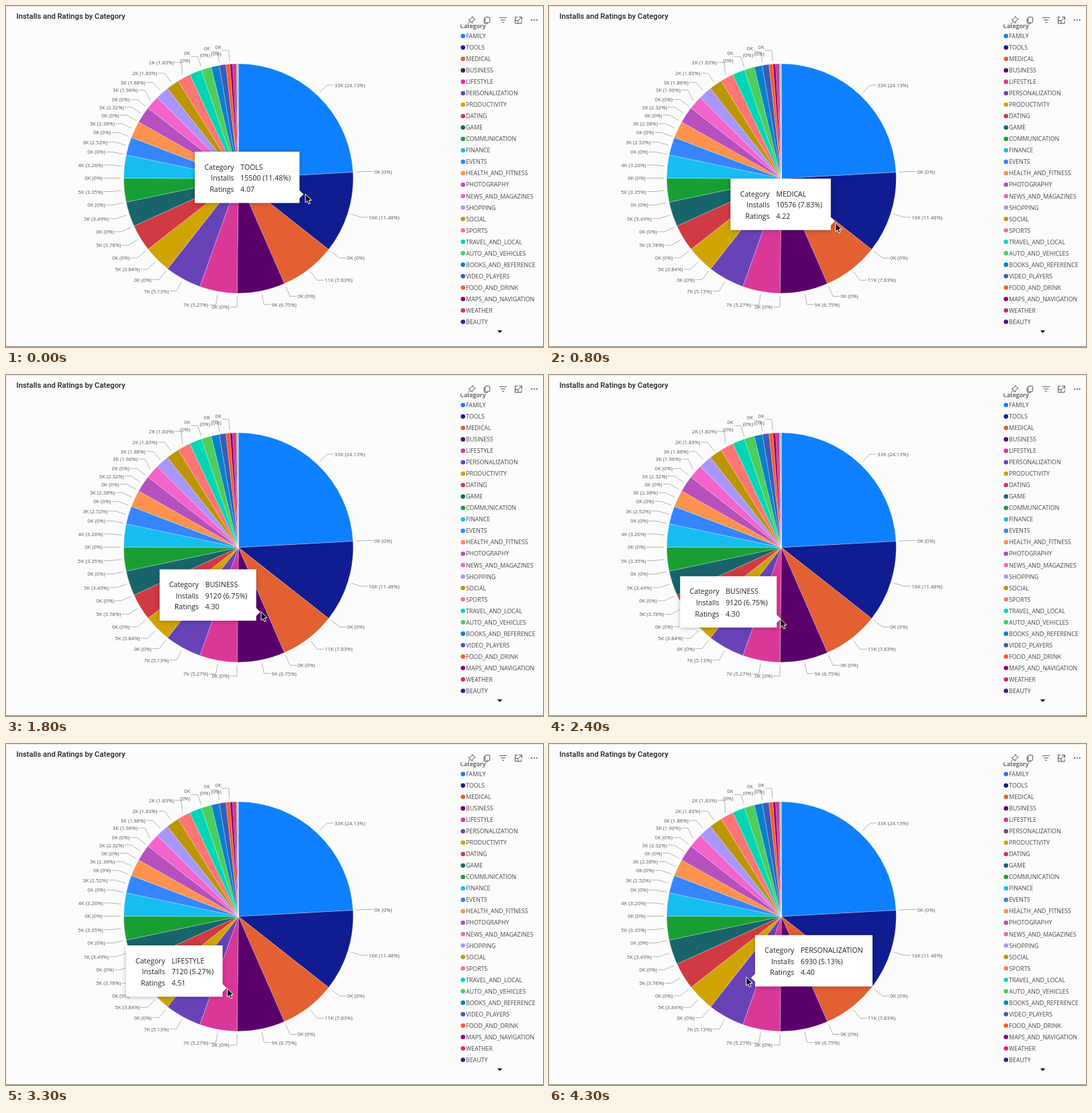
These frames come from a looping animation (800x508 px, 4.4 s). An HTML page:

```html
<!DOCTYPE html>
<html lang="en">
<head>
<meta charset="utf-8">
<title>Installs and Ratings by Category</title>
<style>
  html, body { margin: 0; width: 100%; height: 100%; overflow: hidden; background: #fcfcfc; }
  svg { display: block; width: 800px; height: 508px; font-family: "Open Sans", "Noto Sans", sans-serif; }
  .title { font: 500 11.25px Roboto, sans-serif; fill: #1f1e1d; }
  .legend { font-size: 8.82px; fill: #4a4846; }
  .label { font-size: 7.7px; fill: #5c5a58; }
  .leader { fill: none; stroke: #a3a19f; stroke-width: 0.8; }
  .slice { stroke: #fff; stroke-width: 0.5; stroke-opacity: 0.55; stroke-linejoin: round; }
  .icon { fill: none; stroke: #55534f; stroke-width: 1; }
  #tip { filter: drop-shadow(0 1px 3px rgba(0, 0, 0, 0.28)); }
  #tip path { fill: #fff; }
  #tip text { font-size: 10.55px; fill: #252423; }
</style>
</head>
<body>
<svg id="stage" viewBox="0 0 800 508">
  <defs><clipPath id="legendClip"><rect x="670" y="27.6" width="130" height="470"/></clipPath></defs>
  <rect width="800" height="508" fill="#fcfcfc"/>
  <rect width="800" height="1" fill="#e4e4e4"/>
  <rect width="1" height="508" fill="#ececec"/>
  <rect y="507" width="800" height="1" fill="#808080"/>
  <text class="title" x="15.6" y="19.4">Installs and Ratings by Category</text>
  <g class="icon">
    <path d="M694.5 15.5l4.6 4.6-1.6.5-2.6 2.6-.3 2.4-5.4-5.4 2.4-.3 2.6-2.6zM691.8 22.8l-3.6 3.6"/>
    <path d="M714.8 16.5h4.4a1.5 1.5 0 0 1 1.5 1.5v5.3a1.5 1.5 0 0 1-1.5 1.5h-4a1.5 1.5 0 0 1-1.5-1.5v-5.3a1.5 1.5 0 0 1 1.1-1.5zM713.2 18.3q-1 .4-1 1.5v4.5q0 2 2 2h3.8"/>
    <path d="M735 17.3h11M737 20.8h7M739 24.3h3"/>
    <path d="M762 16.5h-3.5v9.5h9.5v-3.5M764 16.5h4.5v4.5M768.3 16.7l-4.8 4.8M758.5 21.5h4.5v4.5"/>
  </g>
  <g fill="#44423f"><circle cx="783" cy="20.8" r="1"/><circle cx="786.8" cy="20.8" r="1"/><circle cx="790.6" cy="20.8" r="1"/></g>
  <g id="legend" class="legend" clip-path="url(#legendClip)">
    <text x="676.6" y="33.2" font-weight="600">Category</text>
    <path d="M731.8 483.3h7.6l-3.8 4z" fill="#111"/>
  </g>
  <g id="pie"></g>
  <g id="labels"></g>
  <g id="tip">
    <path id="box"/>
    <g id="tipText"></g>
  </g>
  <path id="cursor" d="M0 0V13L2.9 10.3 4.9 15 7.2 14 5.2 9.4H9.2Z" fill="#0a0a0a" stroke="#fff" stroke-width="1" stroke-linejoin="round"/>
</svg>
<script>
const $ = id => document.getElementById(id);
const CX = 346.3, CY = 257, R = 170.9;

// name, colour, share of the whole in percent
const slices = `FAMILY 0f80ff 24.13
TOOLS 111c90 11.48
MEDICAL e26032 7.83
BUSINESS 5b006b 6.75
LIFESTYLE da3899 5.27
PERSONALIZATION 6843b8 5.13
PRODUCTIVITY d0a400 3.84
DATING d13a43 3.78
GAME 17646a 3.49
COMMUNICATION 189f33 3.35
FINANCE 16bdf2 3.26
EVENTS 3585ff 2.52
HEALTH_AND_FITNESS ff924e 2.38
PHOTOGRAPHY b550be 2.32
NEWS_AND_MAGAZINES f264cb 1.96
SHOPPING aa95ff 1.88
SOCIAL bb9500 1.83
SPORTS ff7474 1.83
TRAVEL_AND_LOCAL 00d6b4 1.74
AUTO_AND_VEHICLES 4ccd5c 1.42
BOOKS_AND_REFERENCE 0482cc 1.14
VIDEO_PLAYERS 3a5bb9 0.94
FOOD_AND_DRINK ff5a20 0.55
MAPS_AND_NAVIGATION 8b007c 0.38
WEATHER e41f80 0.32
BEAUTY 47197f 0.18`.split("\n").map(row => {
  const [name, colour, share] = row.split(" ");
  return { name, colour: "#" + colour, share: +share };
});

function add(parent, tag, attrs, text) {
  const el = document.createElementNS("http://www.w3.org/2000/svg", tag);
  for (const key in attrs) el.setAttribute(key, attrs[key]);
  if (text) el.textContent = text;
  parent.appendChild(el);
  return el;
}

function polar(percent, r) {
  const a = percent / 50 * Math.PI;
  return [CX + r * Math.sin(a), CY - r * Math.cos(a)];
}

function drawSlice(from, to, fill) {
  add($("pie"), "path", {
    class: "slice", fill,
    d: `M${CX} ${CY}L${polar(from, R)}A${R} ${R} 0 0 1 ${polar(to, R)}Z`
  });
}

function drawLabel(percent, lines, dx = 0, dy = 0) {
  const side = percent < 50 ? 1 : -1;
  let [x, y] = polar(percent, 191.5);
  x += dx;
  y += dy;
  add($("labels"), "path", { class: "leader", d: `M${polar(percent, 175.5)}L${x} ${y}h${side * 10}` });
  lines.forEach((line, i) => add($("labels"), "text", {
    class: "label", x: x + side * 11.2, y: y + 3 + (i - (lines.length - 1) / 2) * 10.4,
    "text-anchor": side > 0 ? "start" : "end"
  }, line));
}

// Pie, its value labels and the legend
const nudges = { NEWS_AND_MAGAZINES: [4.5, -5], SPORTS: [6, -4.5] };
let sum = 0;
slices.forEach(({ name, colour, share }, i) => {
  const start = sum;
  sum += share;
  drawSlice(start, sum, colour);
  if (i < 18) {
    const thousands = Math.round(share * 1.3503);
    drawLabel(start + share / 2, [`${thousands}K (${share.toFixed(2)}%)`], ...(nudges[name] || []));
  }
  if (i < 14 && i !== 4) drawLabel(sum, ["0K (0%)"]);
  const y = 44.8 + i * 17.03;
  add($("legend"), "circle", { cx: 680.8, cy: y, r: 3.3, fill: colour });
  add($("legend"), "text", { x: 685.2, y: y + 3.3 }, name);
});
drawSlice(sum, 99.85, "#c9a9b8");
drawSlice(99.85, 100, "#a9adb5");
[94.87, 97.4, 98.8].forEach(p => drawLabel(p, ["0K", "(0%)"]));

// start time, category, installs, rating, box width
const hovers = [
  [0, "TOOLS", "15500 (11.48%)", "4.07", 156],
  [700, "MEDICAL", "10576 (7.83%)", "4.22", 149.5],
  [1700, "BUSINESS", "9120 (6.75%)", "4.30", 144],
  [2900, "LIFESTYLE", "7120 (5.27%)", "4.51", 144],
  [4200, "PERSONALIZATION", "6930 (5.13%)", "4.40", 175]
];

// time, cursor x, cursor y, near edge of the box, bottom of the box
const track = [
  [0, 446, 280, 437.3, 293.5],
  [400, 438, 304.8, 430.3, 315.5],
  [700, 430, 321, 423, 331.5],
  [1100, 417.5, 329.5, 410.5, 340.5],
  [1400, 417.3, 329.5, 410.5, 340.5],
  [1800, 380, 352.5, 372.8, 366],
  [2200, 345, 363, 339.3, 376],
  [2700, 344.5, 363.3, 339.2, 376.8],
  [2900, 331, 364, 324, 376.8],
  [3500, 329, 364, 322, 376.5],
  [3700, 319, 361, 311.2, 374],
  [3900, 306, 353.3, 311.2, 374],
  [4100, 299, 350, 311.2, 374],
  [4200, 296, 348, 309, 362],
  [4300, 293.8, 347, 307, 361.2]
];

function sample(t) {
  const i = track.findLastIndex(row => row[0] <= t);
  const a = track[i], b = track[i + 1] || a;
  const k = b === a ? 0 : (t - a[0]) / (b[0] - a[0]);
  return a.map((v, j) => v + (b[j] - v) * k);
}

const values = ["Category", "Installs", "Ratings"].map((name, i) => {
  const y = 26.5 + i * 16.6;
  add($("tipText"), "text", { x: 58.3, y, "text-anchor": "end" }, name);
  return add($("tipText"), "text", { x: 68, y });
});

const LOOP = 4400, STEP = 100, HEIGHT = 76.5;
let shown = -1;

function draw(now) {
  const t = Math.floor(now % LOOP / STEP) * STEP;
  if (t === shown) return;
  shown = t;
  const [, x, y, edge, bottom] = sample(t);
  const [start, category, installs, rating, width] = hovers.findLast(h => h[0] <= t);
  const onRight = start === 4200;
  const left = onRight ? edge : edge - width;
  const dir = onRight ? -1 : 1;
  $("box").setAttribute("d",
    `M${left} ${bottom - HEIGHT}h${width}v${HEIGHT}h${-width}z` +
    `M${edge} ${bottom - 19}l${dir * 6} 6l${dir * -6} 6z`);
  $("tipText").setAttribute("transform", `translate(${left} ${bottom - HEIGHT})`);
  [category, installs, rating].forEach((text, i) => values[i].textContent = text);
  $("cursor").setAttribute("transform", `translate(${x} ${y})`);
}

const begin = performance.now();
function tick() {
  draw(performance.now() - begin);
  requestAnimationFrame(tick);
}
tick();
</script>
</body>
</html>
```
